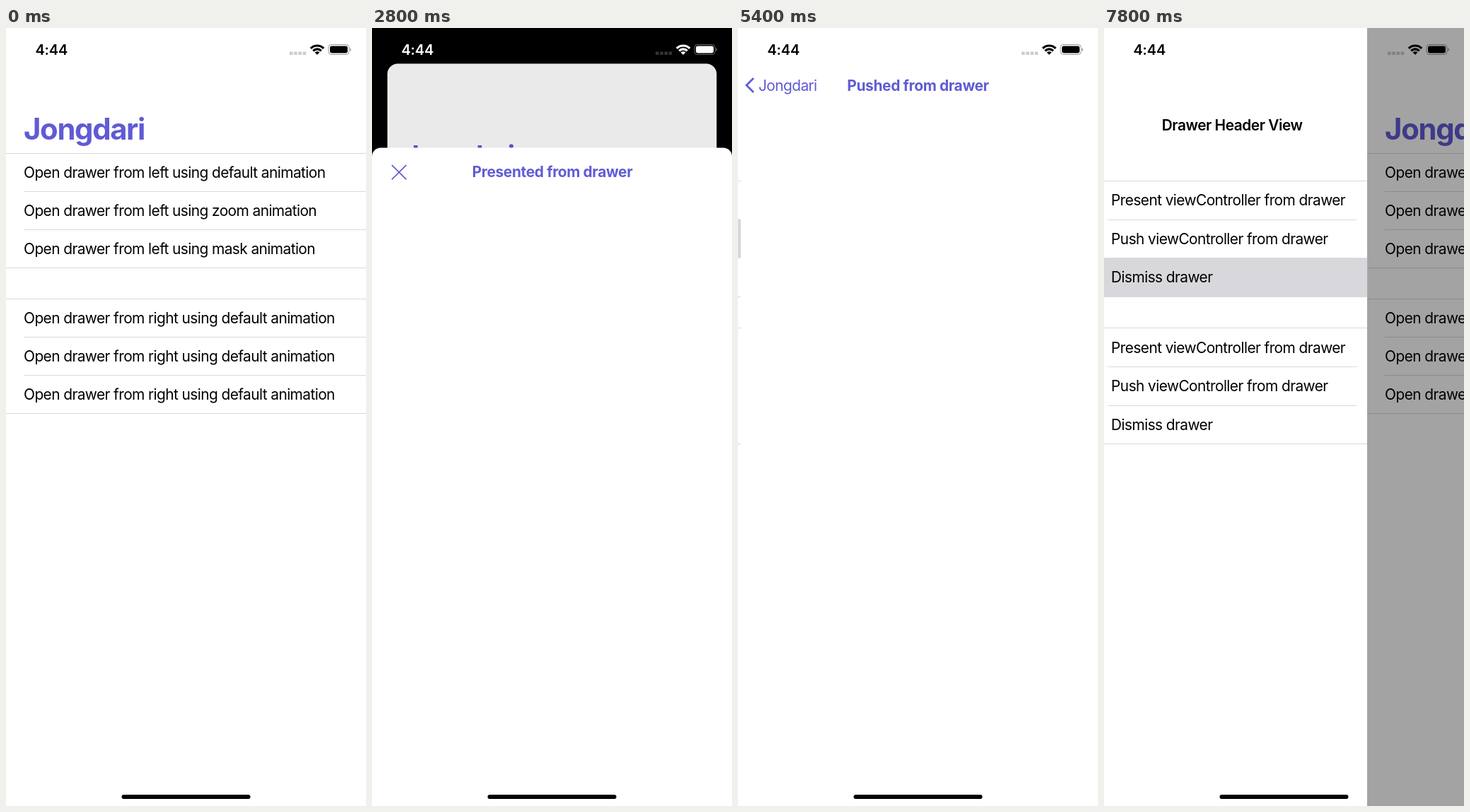
An HTML page for the animation above (8000 ms loop, 509 by 1101 pixels).

```html
<!DOCTYPE html>
<html lang="en">
<head>
<meta charset="utf-8">
<title>Drawer demo</title>
<style>
  html, body { margin: 0; width: 100%; height: 100%; overflow: hidden; background: #fff; }
  svg { display: block; width: 100%; height: 100%; }
  text { font: 20.9px Inter, sans-serif; font-optical-sizing: none; letter-spacing: -.0283em; white-space: pre; }
  .large { font-size: 41.8px; font-weight: 700; letter-spacing: -.032em; }
  .head { font-weight: 600; letter-spacing: -.0235em; }
  .nav { font-weight: 700; letter-spacing: -.017em; }
  .clock { font-size: 20px; font-weight: 600; letter-spacing: -.01em; }
  .tint { fill: #605bd4; }
  .icon { fill: none; stroke: #605bd4; stroke-width: 1.6; }
  .line { fill: #d9d9dc; }
  .mid { text-anchor: middle; }
</style>
</head>
<body>
<svg viewBox="0 0 509 1101">
  <rect width="509" height="1101"/>

  <g id="page">
    <rect class="card" width="509" height="1101" fill="#fff"/>
    <text class="large tint" x="25" y="157.5">Jongdari</text>
    <g id="pageRows"></g>
    <rect class="card" id="dim" width="509" height="1101"/>
  </g>

  <g id="pushed">
    <rect width="509" height="1101" fill="#fff"/>
    <path class="icon" style="stroke-width:2.8" d="M22 71 L12 81 L22 91"/>
    <text class="tint" x="29" y="88.5">Jongdari</text>
    <text class="nav tint mid" x="254.5" y="88.5">Pushed from drawer</text>
  </g>

  <g id="sheet">
    <rect width="509" height="1120" rx="12.3" fill="#fff"/>
    <path class="icon" d="M28 24.5 L48.5 45 M48.5 24.5 L28 45"/>
    <text class="nav tint mid" x="255" y="42">Presented from drawer</text>
  </g>

  <g id="drawer">
    <rect width="382" height="1101" fill="#fff"/>
    <text class="head mid" x="191" y="145">Drawer Header View</text>
    <g id="drawerLines"></g>
    <rect id="highlight" width="382" height="55" fill="#d8d7dc"/>
    <g id="drawerTexts"></g>
  </g>

  <g id="status">
    <text class="clock" x="41.5" y="37.5">4:44</text>
    <path opacity=".2" d="M401 33.5h4.6v4.5h-4.6z m6.2 0h4.6v4.5h-4.6z m6.2 0h4.6v4.5h-4.6z m6.2 0h4.6v4.5h-4.6z"/>
    <path fill="none" stroke="currentColor" stroke-width="3.2"
          d="M430.8 28.8 A13 13 0 0 1 449.2 28.8 M434.3 32.3 A8 8 0 0 1 445.7 32.3"/>
    <path d="M440 38 L436.6 34.6 A4.8 4.8 0 0 1 443.4 34.6 Z"/>
    <rect x="456" y="23.5" width="29" height="14" rx="4" fill="none" stroke="currentColor" opacity=".4"/>
    <rect x="458" y="25.5" width="25" height="10" rx="2.4"/>
    <path opacity=".45" d="M486.4 28 q3 2.5 0 5z"/>
  </g>
  <rect x="163.5" y="1085" width="182" height="6" rx="3"/>
</svg>
<script>
const $ = id => document.getElementById(id);
const WIDTH = 509, HEIGHT = 1101, DRAWER = 382;

const line = (x1, x2, y) => `<rect class="line" x="${x1}" y="${y}" width="${x2 - x1}" height="1"/>`;
const label = (x, y, s) => `<text x="${x}" y="${y}">${s}</text>`;

// One section of a table: full-width outer lines, inset inner ones.
function section(top, rowHeight, names, width, insetLeft, insetRight, textX, baseline) {
  let lines = '', texts = '';
  for (let i = 0; i <= names.length; i++) {
    const inner = i > 0 && i < names.length;
    lines += line(inner ? insetLeft : 0, inner ? width - insetRight : width, Math.round(top + i * rowHeight));
    if (i < names.length) texts += label(textX, top + i * rowHeight + baseline, names[i]);
  }
  return { lines, texts };
}

const left = ['default', 'zoom', 'mask'].map(s => `Open drawer from left using ${s} animation`);
const right = Array(3).fill('Open drawer from right using default animation');
const actions = ['Present viewController from drawer', 'Push viewController from drawer', 'Dismiss drawer'];

for (const [top, names] of [[177, left], [383, right]]) {
  const s = section(top, 54.1, names, WIDTH, 25, 0, 25, 34.5);
  $('pageRows').innerHTML += s.lines + s.texts;
}
for (const top of [216, 424.3]) {
  const s = section(top, 54.6, actions, DRAWER, 15, 15, 20, 35.2);
  $('drawerLines').innerHTML += s.lines;
  $('drawerTexts').innerHTML += s.texts;
}

const clamp = x => Math.min(1, Math.max(0, x));
const smooth = x => (x = clamp(x), x * x * (3 - 2 * x));

// Critically damped spring from 0 to 1; settles exactly.
function spring(ms, rate) {
  const x = Math.max(0, ms) / 1000 * rate;
  const rest = (1 + x) * Math.exp(-x);
  return rest < .005 ? 1 : 1 - rest;
}

// When the drawer opens, when it closes, and the row tapped.
const sessions = [[1106, 2365, 0], [4365, 5165, 1], [7053, 7776, 2]];
const SLIDE = 250;

function render(t) {
  let open = 0, tapped = -1;
  for (const [openAt, closeAt, row] of sessions) {
    open += smooth((t - openAt) / SLIDE) - smooth((t - closeAt) / SLIDE);
    if (t >= closeAt && t < closeAt + SLIDE) tapped = row;
  }
  const sheet = spring(t - 2429, 10.5) - spring(t - 3452, 10.5);
  const push = spring(t - 5229, 45) - spring(t - 6001, 13.6);

  const edge = open * DRAWER;
  const scale = 1 - .095 * sheet;
  const pageX = edge - .3 * WIDTH * push + WIDTH * (1 - scale) / 2;
  $('page').setAttribute('transform', `translate(${pageX} ${56 * sheet}) scale(${scale})`);
  const radius = sheet > 0 ? 51 - 38.7 * sheet : 0;
  for (const card of document.querySelectorAll('.card')) card.setAttribute('rx', radius);
  $('dim').setAttribute('opacity', .37 * open + .1 * push + .1 * sheet * sheet);

  const place = (id, shown, x, y) => {
    $(id).setAttribute('display', shown ? 'inline' : 'none');
    $(id).setAttribute('transform', `translate(${x} ${y})`);
  };
  place('pushed', push > 0, WIDTH * (1 - push), 0);
  place('sheet', sheet > 0, 0, HEIGHT - 1034.6 * sheet);
  place('drawer', open > 0, edge - DRAWER, 0);
  place('highlight', tapped >= 0, 0, 216 + 54.6 * tapped);

  const tone = Math.round(255 * clamp(sheet * 4.6));
  $('status').style.color = $('status').style.fill = `rgb(${tone},${tone},${tone})`;
}

function tick() {
  const t = performance.now() % 8000;
  render(Math.floor(t / 200) * 200);
  requestAnimationFrame(tick);
}
tick();
</script>
</body>
</html>
```
